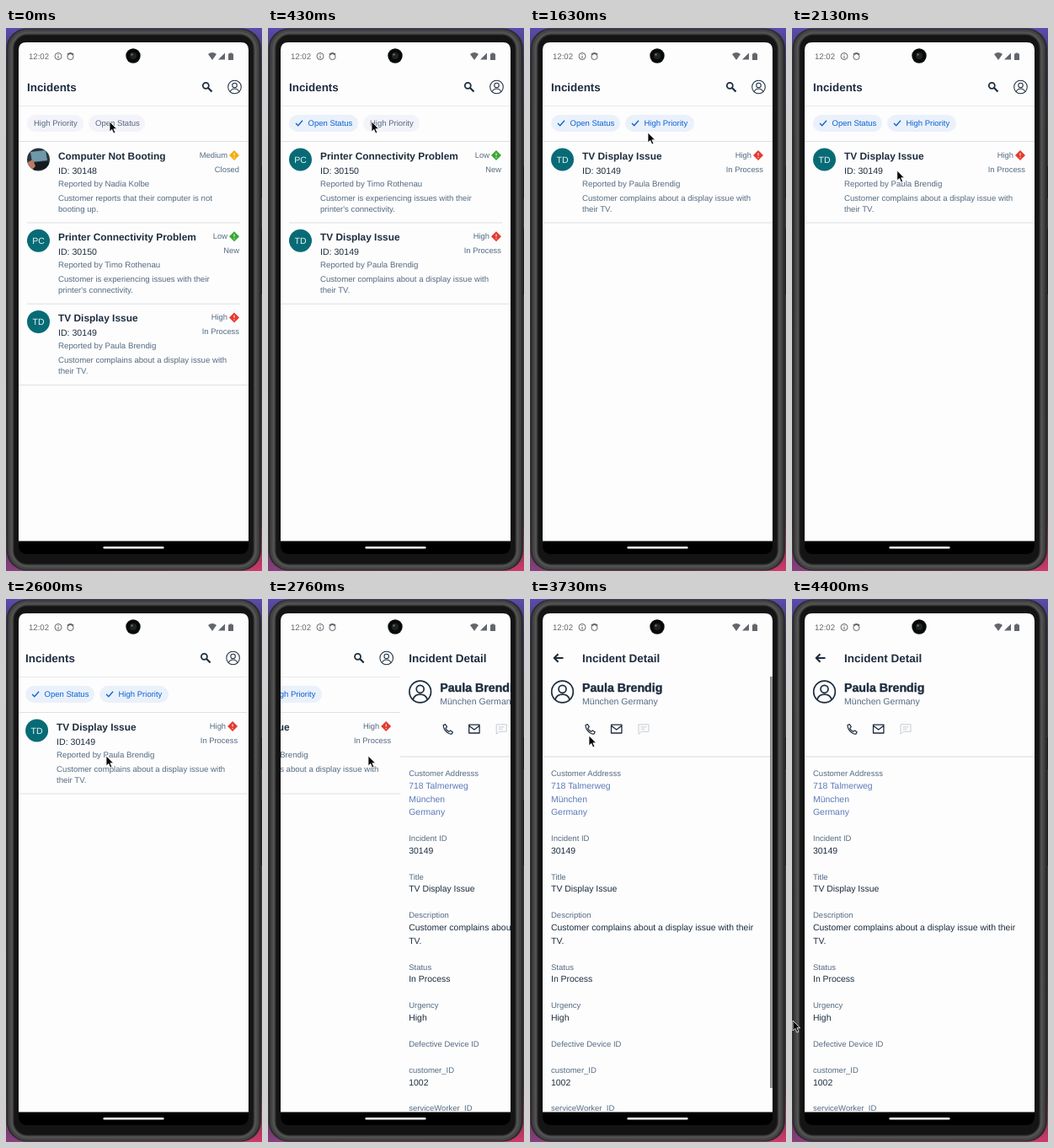
These frames come from a looping animation (304x644 px, 4.63 s). An HTML page:

```html
<!DOCTYPE html>
<html lang="en">
<head>
<meta charset="utf-8">
<title>Incidents</title>
<style>
  html, body { margin: 0; width: 100%; height: 100%; overflow: hidden; background: #262626; }
  svg { display: block; width: 100%; height: 100%; }
  text { font-family: "Liberation Sans", Arial, sans-serif; white-space: pre; text-rendering: geometricPrecision; }
</style>
</head>
<body>
<svg viewBox="0 0 304 644">
  <defs>
    <linearGradient id="floor"><stop stop-color="#86407f"/><stop offset="1" stop-color="#cf3a6c"/></linearGradient>
    <linearGradient id="wall" x2="0" y2="1">
      <stop offset="0" stop-color="#5a4cae"/><stop offset=".06" stop-color="#43365c"/>
      <stop offset=".2" stop-color="#3a3035"/><stop offset=".9" stop-color="#3d3035"/>
      <stop offset="1" stop-color="#3d3035" stop-opacity="0"/>
    </linearGradient>
    <clipPath id="view"><rect x="15" y="46" width="273" height="562"/></clipPath>
    <clipPath id="round"><circle cx="38.5" cy="156" r="13.5"/></clipPath>
  </defs>
  <rect width="304" height="644" fill="url(#floor)"/>
  <rect width="304" height="644" fill="url(#wall)"/>
  <g fill="#1d1d1f"><rect x="300" y="164" width="4" height="38"/><rect x="300" y="238" width="4" height="78"/></g>
  <rect x=".5" y=".5" width="302.5" height="643" rx="24" fill="#2b2b2b"/>
  <g fill="none">
    <rect x="5.5" y="4.5" width="292" height="635" rx="20" stroke="#434343" stroke-width="6"/>
    <rect x="6.5" y="5.5" width="290" height="633" rx="19" stroke="#525252" stroke-width="2.5"/>
  </g>
  <rect x="9.5" y="8.5" width="284" height="627" rx="16" fill="#141414"/>
  <rect x="15" y="17" width="273" height="607" rx="9" fill="#000"/>
  <path d="M15 608.5V26q0-9 9-9H279q9 0 9 9V608.5Z" fill="#fdfdfd"/>
  <g clip-path="url(#view)"><g id="pages"></g></g>
  <g id="status" fill="#62666b">
    <text x="27" y="37" font-size="9.6">12:02</text>
    <g fill="none" stroke="#62666b">
      <circle cx="62" cy="33.5" r="4"/><path d="M62 33v3M62 31v1"/>
      <circle cx="76.5" cy="34" r="3.6"/><path d="M73 31.5q3.5-3 7 0" stroke-width="2"/>
    </g>
    <path d="M240 31q5-4 10 0L245 38ZM252 37.5H260V29.5ZM264 30.5h1.5v-1h3v1H270V38H264Z"/>
  </g>
  <circle cx="151" cy="33" r="8.7" fill="#080909"/>
  <circle cx="151" cy="33" r="4" fill="#202326"/><circle cx="149.5" cy="31.5" r="1.2" fill="#687075"/>
  <rect x="115.5" y="615" width="72" height="2.6" rx="1.3" fill="#fff"/>
  <path id="cursor" d="M0 0V12L2.8 9.4L4.8 14L6.9 13.1L4.9 8.7H8.6Z" fill="#080808" stroke="#fff" stroke-width=".8"/>
</svg>
<script>
const LOOP = 4630, PAGE_WIDTH = 273;
const INK = '#1d2d3e', MUTED = '#556b82', BLUE = '#0a62d0', LINK = '#5c7ab9';

// Picture updates on a 30 Hz clock: [first tick, last tick, number of updates].
const updates = [0, ...[
  [1, 15, 8], [17, 19, 2], [25, 35, 5], [40, 49, 6], [55, 70, 8], [76, 82, 4],
  [85, 91, 4], [92, 92, 1], [102, 112, 6], [116, 132, 9]
].flatMap(([first, last, n]) => Array.from({ length: n }, (_, i) =>
  Math.floor(Math.round(first + (last - first) * i / Math.max(1, n - 1)) * 10 / 3) * 10))];

const cursorPath = [
  [0, 123, 111], [800, 123, 111], [1160, 144, 113], [1460, 144, 113], [1630, 140, 124],
  [1760, 140, 124], [2330, 119, 186], [3330, 119, 186], [3730, 70, 162],
  [3860, 70, 162], [4400, 1, 500], [LOOP, 1, 500]
];

const text = (x, y, size, content, fill = MUTED, extra = '') =>
  `<text x="${x}" y="${y}" font-size="${size}" fill="${fill}" ${extra}>${content}</text>`;
const bold = (x, y, size, content, extra = '') => text(x, y, size, content, INK, 'font-weight="700" ' + extra);
const right = (x, y, content) => text(x, y, 9.4, content, MUTED, 'text-anchor="end"');
const line = (x1, x2, y, color = '#dcdfe4') => `<path d="M${x1} ${y}H${x2}" stroke="${color}"/>`;
const stroke = (d, width = 1.3, color = INK) =>
  `<path d="${d}" fill="none" stroke="${color}" stroke-width="${width}" stroke-linejoin="round"/>`;

const person = (x, y, r) => `<g transform="translate(${x} ${y}) scale(${r / 12})" fill="none" stroke="${INK}" stroke-width="1.6">
  <circle r="12"/><circle cy="-3" r="4.2"/><path d="M-8 8.5Q-6 3 0 3T8 8.5"/></g>`;

const photo = `<g clip-path="url(#round)"><path d="M24 142h30v30H24Z" fill="#29343b"/>
  <path d="M29 147L47 145L49 157L31 159Z" fill="#6f98aa"/><path d="M30 160L50 158L53 166L33 169Z" fill="#151a20"/>
  <path d="M24 160L32 156L35 164L28 171Z" fill="#ba7964"/></g>`;

const incidents = [
  { title: 'Computer Not Booting', id: 30148, by: 'Nadia Kolbe', priority: 'Medium', color: '#f3ad13', status: 'Closed',
    lines: ['Customer reports that their computer is not', 'booting up.'] },
  { title: 'Printer Connectivity Problem', id: 30150, by: 'Timo Rothenau', priority: 'Low', color: '#3aa835', status: 'New',
    initials: 'PC', lines: ['Customer is experiencing issues with their', 'printer\'s connectivity.'] },
  { title: 'TV Display Issue', id: 30149, by: 'Paula Brendig', priority: 'High', color: '#e53a2f', status: 'In Process',
    initials: 'TD', lines: ['Customer complains about a display issue with', 'their TV.'] }
];

function card(item, index, all) {
  const avatar = item.initials
    ? `<circle cx="38.5" cy="156" r="13.5" fill="#076b76"/>` +
      text(38.5, 160, 10.5, item.initials, '#e9f5f5', 'text-anchor="middle"')
    : photo;
  const last = index === all.length - 1;
  return `<g transform="translate(0 ${index * 96.2})">${avatar}
    ${bold(62, 155.5, 11.9, item.title)}
    ${text(62, 173, 10.6, 'ID: ' + item.id, INK)}
    ${text(62, 188, 9.7, 'Reported by ' + item.by)}
    ${item.lines.map((s, i) => text(62, 205 + i * 13, 9.65, s)).join('')}
    ${right(263, 154, item.priority)}${right(277, 171, item.status)}
    <path d="M271 145L277 151L271 157L265 151Z" fill="${item.color}"/>
    <path d="M271 148.3v3.2M271 153v1.2" stroke="#fff"/>
    ${last ? line(15, 288, 231) : line(25, 278, 231)}</g>`;
}

function chip(x, label, selected) {
  return `<rect x="${x}" y="103" width="${selected ? 82 : 67}" height="20" rx="10" fill="${selected ? '#eaf1fb' : '#f3f3f9'}"/>` +
    (selected ? stroke(`M${x + 8} 113l2.7 2.8l5.3-6`, 1.3, BLUE) : '') +
    text(x + (selected ? 22.5 : 8), 116.3, 9.5, label, selected ? BLUE : MUTED);
}

function listPage(t) {
  const open = t >= 100, high = t >= 1330;
  const chips = open
    ? chip(25, 'Open Status', true) + chip(113, 'High Priority', high)
    : chip(25, 'High Priority') + chip(98, 'Open Status');
  const shown = incidents.slice(t >= 1400 ? 2 : t >= 230 ? 1 : 0);
  return bold(25, 75, 13.4, 'Incidents') +
    `<circle cx="237.3" cy="68.3" r="3.5" fill="none" stroke="${INK}" stroke-width="1.8"/>` +
    stroke('M240 71L244.5 75.5', 2.2) + person(271.5, 70, 7.8) +
    line(15, 288, 92.5, '#e8eaee') + chips + line(15, 288, 134.5) + shown.map(card).join('');
}

const label = (y, s) => text(25, y, 9.5, s);
const value = (y, s, color = INK) => text(25, y, 10.45, s, color);

function detailPage(t) {
  const back = t >= 2960;
  return (back ? stroke('M39.5 70H29M33.5 65.2L28.7 70L33.5 74.8', 2.1) : '') +
    bold(back ? 62 : 25, 75, 13.5, 'Incident Detail') +
    person(38.5, 110, 12.8) +
    bold(62, 109.5, 14.2, incidents[2].by, `stroke="${INK}" stroke-width=".4"`) +
    text(62, 125, 10.55, 'München Germany') +
    stroke('M66 149.5l2.3-.9l2 3.1l-1.6 1.7q1.3 2.8 4 4l1.7-1.5l2.7 1.9l-1 2.2q-2 .8-5.2-1.5q-5-4-4.9-9Z', 1.2) +
    stroke('M96.5 149.2h12.4v9.8h-12.4ZM96.5 150.2l6.2 4.8l6.2-4.8') +
    stroke('M129 148.8h12v8.4h-8.5l-3.5 3ZM131.5 151.8h7M131.5 154.3h5', 1, '#c5cbd3') +
    line(15, 288, 187, '#d6d9dd') +
    label(210, 'Customer Addresss') + value(225, '718 Talmerweg', LINK) +
    value(240.5, 'München', LINK) + value(256, 'Germany', LINK) +
    label(287, 'Incident ID') + value(302, '30149') +
    label(332.5, 'Title') + value(347, 'TV Display Issue') +
    label(378, 'Description') + value(393, 'Customer complains about a display issue with their') + value(408.5, 'TV.') +
    label(439.5, 'Status') + value(454, 'In Process') +
    label(485, 'Urgency') + value(500, 'High') +
    label(530.5, 'Defective Device ID') +
    label(561.5, 'customer_ID') + value(576.5, '1002') +
    label(607, 'serviceWorker_ID') +
    (t < 4060 ? '<rect x="285" y="92" width="2.8" height="488" fill="#8c8f92"/>' : '');
}

const progress = (t, start, end) => Math.min(1, Math.max(0, (t - start) / (end - start)));
const ease = p => (1 - Math.cos(Math.PI * p)) / 2;

function cursorAt(t) {
  const i = Math.max(1, cursorPath.findIndex(point => point[0] >= t));
  const [t0, x0, y0] = cursorPath[i - 1], [t1, x1, y1] = cursorPath[i];
  const p = ease(progress(t, t0, t1));
  return [x0 + (x1 - x0) * p, y0 + (y1 - y0) * p];
}

const pages = document.getElementById('pages'), cursor = document.getElementById('cursor');
let drawn = -1;

function render(t) {
  const slide = ease(progress(t, 2584, 2884)) * PAGE_WIDTH;
  const place = (x, content) => `<g transform="translate(${x} 0)">${content}</g>`;
  pages.innerHTML = (slide < PAGE_WIDTH ? place(-slide, listPage(t)) : '') +
    (slide > 0 ? place(PAGE_WIDTH - slide, detailPage(t)) : '');
  cursor.setAttribute('transform', `translate(${cursorAt(t)})`);
}

function tick() {
  const now = performance.now() % LOOP;
  const t = updates.findLast(time => time <= now);
  if (t !== drawn) render(drawn = t);
  requestAnimationFrame(tick);
}
tick();
</script>
</body>
</html>
```
